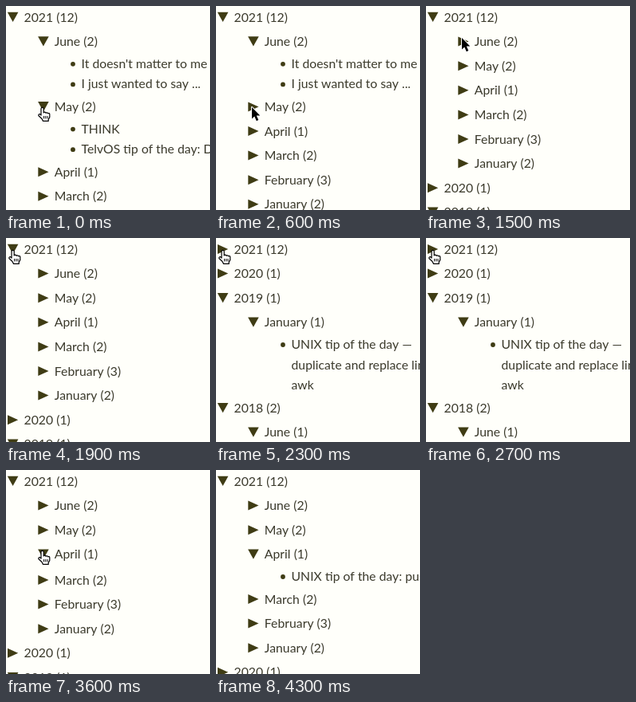
An HTML page with a canvas for the animation above (4.4 s loop, 256 by 256 pixels).

```html
<!DOCTYPE html>
<html lang="en">
<head>
<meta charset="utf-8">
<title>Archive tree</title>
<style>
html, body { margin: 0; width: 100%; height: 100%; overflow: hidden; background: #fffffa; }
canvas { display: block; width: 100vw; height: 100vh; }
</style>
</head>
<body>
<canvas id="stage"></canvas>
<script>
const SIZE = 256, LOOP = 4400, STEP = 100, SLIDE = 200;
const ROW = 30.6, LINE = 25.6;
const PAPER = "#fffffa", INK = "#3b3a2c", MARK = "#3f3c14";

const canvas = document.getElementById("stage");
const ctx = canvas.getContext("2d");

// A node's toggles are the times at which it flips between open and closed.
const node = (label, kids = [], open = false, toggles = []) => ({ label, kids, open, toggles });

const tree = [
  node("2021 (12)", [
    node("June (2)", ["It doesn't matter to me", "I just wanted to say ..."], true, [1290]),
    node("May (2)", ["THINK", "TelvOS tip of the day: Drag"], true, [250]),
    node("April (1)", ["UNIX tip of the day: push and pop"], false, [3568]),
    node("March (2)"),
    node("February (3)"),
    node("January (2)")
  ], true, [1960, 2720]),
  node("2020 (1)"),
  node("2019 (1)", [
    node("January (1)", [["UNIX tip of the day —", "duplicate and replace lines", "awk"]], true)
  ], true),
  node("2018 (2)", [node("June (1)", ["Notes"], true)], true)
];

// time, x, y, cursor shape from that time on
const path = [
  [0, 45, 127, "hand"], [600, 45, 127, "arrow"], [1000, 42, 70, "arrow"],
  [1200, 45, 40, "hand"], [1500, 45, 40, "arrow"], [1800, 8, 15, "hand"],
  [2900, 8, 15, "hand"], [3000, 17, 28, "arrow"], [3500, 45, 101, "hand"],
  [4300, 45, 101, "none"]
];

const arrow = new Path2D("M0 0V14.5L3.3 11.5 5.8 17.2 8.3 16.1 5.8 10.6H10.3Z");
const hand = new Path2D("M4 10V2a1.6 1.6 0 0 1 3.2 0V7a1.5 1.5 0 0 1 2.8 .3a1.5 1.5 0 0 1 2.6 .6" +
  "a1.3 1.3 0 0 1 2.2 1v3.5l-1.6 3v2H6.5L5 14.5 1 10.8a1.4 1.4 0 0 1 1.8 -2Z");
const knuckles = new Path2D("M7.6 11v3.4M9.8 11v3.4M12 11v3.4");

const swing = p => 0.5 - Math.cos(Math.PI * p) / 2;

function state(n, t) {
  let open = n.open, amount = open ? 1 : 0;
  for (const start of n.toggles) {
    if (t < start) break;
    open = !open;
    const p = swing(Math.min((t - start) / SLIDE, 1));
    amount = open ? p : 1 - p;
  }
  return { open, amount };
}

function listHeight(kids, t) {
  return kids.reduce((sum, kid) => sum + (kid.label ? ROW + listHeight(kid.kids, t) * state(kid, t).amount
    : [].concat(kid).length * LINE), 0);
}

function write(text, x, y) {
  ctx.fillStyle = INK;
  ctx.fillText(text, x, y + 5.6);
}

function triangle(x, y, open) {
  const points = open ? [[0, -6.3], [13.6, -6.3], [6.8, 6]] : [[0.2, -6], [13.4, 0], [0.2, 6]];
  ctx.fillStyle = MARK;
  ctx.beginPath();
  points.forEach(([dx, dy]) => ctx.lineTo(x + dx, y + dy));
  ctx.fill();
}

function drawItems(items, y) {
  for (const item of items) {
    ctx.fillStyle = MARK;
    ctx.beginPath();
    ctx.arc(84, y + 0.6, 2.9, 0, 7);
    ctx.fill();
    for (const line of [].concat(item)) {
      write(line, 94.5, y);
      y += LINE;
    }
  }
}

function drawNodes(nodes, level, y, t) {
  for (const n of nodes) {
    const x = 1.8 + level * 38.3;
    const { open, amount } = state(n, t);
    triangle(x, y, open);
    write(n.label, x + 20.7, y);
    const height = listHeight(n.kids, t) * amount;
    if (height > 0) {
      ctx.save();
      ctx.beginPath();
      ctx.rect(0, y + 13, SIZE, height + 4);
      ctx.clip();
      if (n.kids[0].label) drawNodes(n.kids, level + 1, y + ROW, t);
      else drawItems(n.kids, y + 27.6);
      ctx.restore();
    }
    y += ROW + height;
  }
}

function drawCursor(t) {
  const i = path.findLastIndex(k => k[0] <= t);
  const [t0, x0, y0, shape] = path[i];
  if (shape === "none") return;
  const [t1, x1, y1] = path[i + 1];
  const p = (t - t0) / (t1 - t0);
  const isHand = shape === "hand";
  ctx.save();
  ctx.translate(x0 + (x1 - x0) * p - (isHand ? 5 : 0), y0 + (y1 - y0) * p);
  ctx.lineJoin = "round";
  if (isHand) {
    ctx.fillStyle = "#fff";
    ctx.strokeStyle = "#000";
    ctx.lineWidth = 1.2;
    ctx.fill(hand);
    ctx.stroke(hand);
    ctx.lineWidth = 1;
    ctx.stroke(knuckles);
  } else {
    ctx.strokeStyle = "#fff";
    ctx.lineWidth = 2;
    ctx.stroke(arrow);
    ctx.fillStyle = "#000";
    ctx.fill(arrow);
  }
  ctx.restore();
}

function resize() {
  const ratio = window.devicePixelRatio || 1;
  canvas.width = Math.round(innerWidth * ratio);
  canvas.height = Math.round(innerHeight * ratio);
}

function draw(now) {
  const t = Math.floor((now % LOOP) / STEP) * STEP;
  ctx.setTransform(canvas.width / SIZE, 0, 0, canvas.height / SIZE, 0, 0);
  ctx.fillStyle = PAPER;
  ctx.fillRect(0, 0, SIZE, SIZE);
  ctx.font = "15.8px Lato, sans-serif";
  drawNodes(tree, 0, 14, t);
  drawCursor(t);
}

let begin;
function tick(now) {
  begin ??= now;
  draw(now - begin);
  requestAnimationFrame(tick);
}

addEventListener("resize", resize);
resize();
draw(0);
requestAnimationFrame(tick);
</script>
</body>
</html>
```
